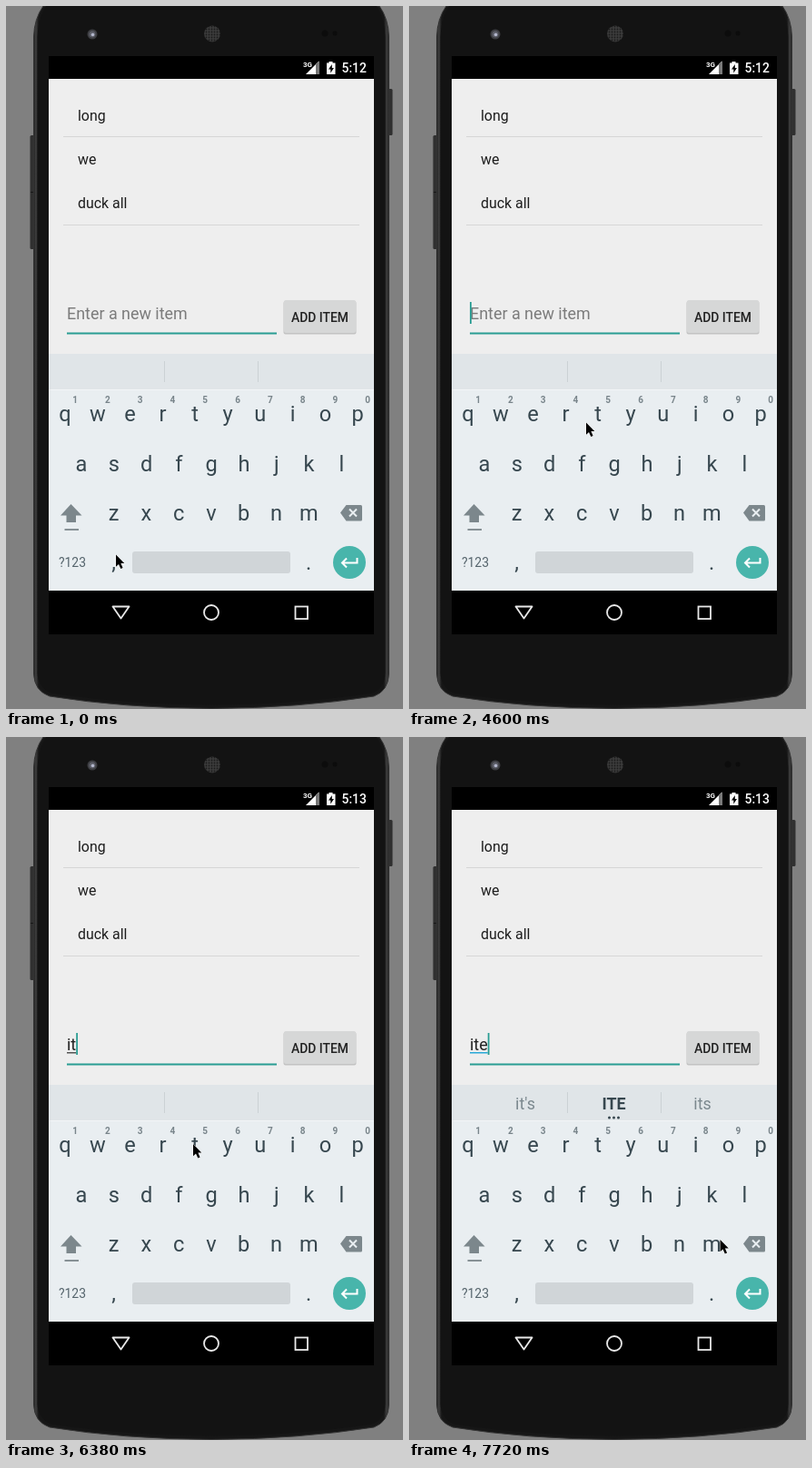
Animation of 437 by 772 pixels, one loop 8000 ms. Source, as an HTML page:

```html
<!DOCTYPE html>
<html lang="en">
<head>
<meta charset="utf-8">
<title>Adding an item</title>
<style>
html, body { margin: 0; height: 100%; overflow: hidden; background: #808080; }
svg { display: block; width: 437px; height: 772px; }
text { font-family: Roboto, Arial, sans-serif; white-space: pre; }
.list { font-size: 15.9px; fill: #1d1d1d; }
.field { font-size: 17.9px; }
.mid { text-anchor: middle; }
.key { font-size: 23.6px; fill: #37474f; }
.digit { font-size: 10px; font-weight: 700; fill: #78848a; }
.word { font-size: 17.9px; fill: #7b888e; }
.best { font-weight: 700; fill: #37474f; }
</style>
</head>
<body>
<svg viewBox="0 0 437 772">
  <defs>
    <linearGradient id="rim">
      <stop offset="0" stop-color="#1c1c1c"/>
      <stop offset=".006" stop-color="#404040"/>
      <stop offset=".014" stop-color="#161616"/>
      <stop offset=".986" stop-color="#161616"/>
      <stop offset=".994" stop-color="#404040"/>
      <stop offset="1" stop-color="#1c1c1c"/>
    </linearGradient>
    <pattern id="mesh" width="3" height="3" patternUnits="userSpaceOnUse">
      <rect width="3" height="3" fill="#3b3b3b"/>
      <circle cx="1.5" cy="1.5" r=".9" fill="#1b1b1b"/>
    </pattern>
  </defs>

  <!-- Phone -->
  <rect width="437" height="772" fill="#808080"/>
  <rect x="26.5" y="142" width="6" height="125" rx="1.5" fill="#303030"/>
  <path d="M27 204.5H31" stroke="#171717"/>
  <rect x="419.500" y="91" width="6" height="51" rx="1.5" fill="#303030"/>
  <path d="M41 0Q31 14 30.500 34V733Q31 752 48 758Q130 771 226 771.500Q322 771 405 758Q421 752 421.500 733V34Q421 14 411 0Z" fill="url(#rim)" stroke="#333"/>
  <path d="M44 0Q35 14 34.500 34V732Q35 749 50 754.500Q130 767 226 767.500Q322 767 403 754.500Q417 749 417.500 732V34Q417 14 408 0Z" fill="#131313"/>
  <circle cx="95" cy="31" r="5.500" fill="#3d3e42"/>
  <circle cx="95" cy="31" r="3.500" fill="#5d5f69"/>
  <circle cx="95.500" cy="31.500" r="1.800" fill="#b3b7cc"/>
  <circle cx="227" cy="30.500" r="9" fill="url(#mesh)"/>
  <circle cx="351" cy="30" r="3.500" fill="#0c0c0c"/>
  <circle cx="362" cy="30" r="2.500" fill="#0c0c0c"/>

  <!-- Status bar -->
  <rect x="47" y="55" width="358" height="635"/>
  <path d="M344.500 60.500V75H330Z" fill="#fff"/>
  <path d="M344.500 60.500V75H341V64Z" fill="#777"/>
  <text x="327" y="67" font-size="8" font-weight="700" fill="#fff">3G</text>
  <path d="M353 62.500H355.500V61H359.500V62.500H362.500V75H353Z" fill="#fff"/>
  <path d="M358.800 64L355 69.500H357.300V73.500L361 68H358.800Z"/>
  <text id="clock" x="369.500" y="73" font-size="13.900" font-weight="500" fill="#fff"></text>

  <!-- List and form -->
  <rect x="47" y="80" width="358" height="302" fill="#eee"/>
  <path d="M63 143.500H389M63 240.500H389" stroke="#d6d6d6"/>
  <g class="list">
    <text x="79" y="125.500">long</text>
    <text x="79" y="174">we</text>
    <text x="79" y="222">duck all</text>
  </g>
  <text id="hint" class="field" x="67" y="344" fill="#7b7b7b">Enter a new item</text>
  <text id="typed" class="field" x="67" y="344" fill="#212121"></text>
  <rect id="mark" x="67" y="346" height="1.500"/>
  <rect id="caret" y="325" width="1.800" height="24" fill="#2a9d93"/>
  <path d="M67 359.500H298" stroke="#2a9d93" stroke-width="1.800"/>
  <rect x="305.500" y="324" width="80" height="36.500" rx="2" fill="#c3c3c3"/>
  <rect x="306" y="323" width="79" height="36" rx="2" fill="#d6d7d7"/>
  <text class="mid" x="345.500" y="347" font-size="13.900" font-weight="500" fill="#212121">ADD ITEM</text>

  <!-- Keyboard -->
  <rect x="47" y="382" width="358" height="39" fill="#e0e5e8"/>
  <rect x="47" y="421" width="358" height="221" fill="#e9eef1"/>
  <path d="M47 421.500H405" stroke="#f2f5f7"/>
  <path d="M174.500 390V413M277.500 390V413" stroke="#cbd1d4"/>
  <g id="words" class="mid"></g>
  <g id="dots" fill="#37474f">
    <circle cx="220.500" cy="418" r="1.500"/>
    <circle cx="225.500" cy="418" r="1.500"/>
    <circle cx="230.500" cy="418" r="1.500"/>
  </g>
  <g id="keys" class="mid"></g>
  <path d="M71.500 547L83.500 559.500H77V567H66.500V559.500H60Z" fill="#7c878c"/>
  <path d="M64.500 575H80" stroke="#7c878c" stroke-width="1.800"/>
  <path d="M368 556.500L374.500 548H390.500Q392 548 392 549.500V564Q392 565.500 390.500 565.500H374.500Z" fill="#7c878c"/>
  <path d="M378 552.500L386 560.500M386 552.500L378 560.500" stroke="#e9eef1" stroke-width="2"/>
  <text x="58" y="616" font-size="13.900" fill="#55646c">?123</text>
  <rect x="139" y="599" width="174" height="24" rx="3" fill="#d0d5d8"/>
  <circle cx="378" cy="611" r="18" fill="#48b5ab"/>
  <path d="M386.500 606V611.500H370.500M375 606.500L370 611.500L375 616.500" fill="none" stroke="#fff" stroke-width="2"/>

  <!-- Navigation bar -->
  <g fill="none" stroke="#e8e8e8" stroke-width="1.800">
    <path d="M117.500 659.500H135.500L126.500 672.500Z" stroke-linejoin="round"/>
    <circle cx="226" cy="666" r="8"/>
    <rect x="318.500" y="659.500" width="13.500" height="13.500"/>
  </g>

  <path id="pointer" d="M0 0V13.200L3 10.400L5.300 15.600L7.600 14.600L5.400 9.600H9.300Z" stroke="#fff" stroke-width="1" paint-order="stroke"/>
</svg>
<script>
const LOOP = 8000;
const $ = id => document.getElementById(id);

// Every track is a list of [start, ...values], each held until the next start.
const pointerTrack = [
  [0, 121, 602.5], [3260, 104, 541.5], [3410, 107, 535], [3560, 115, 525],
  [3710, 126, 515], [3860, 140, 506], [4010, 151, 499], [4300, 163, 485],
  [4450, 181, 470], [4600, 195, 457.5], [4750, 225, 453], [4900, 264, 451],
  [5050, 299, 453], [5200, 318, 456], [5640, 297, 451], [5790, 259, 447],
  [5940, 226, 447], [6090, 209, 447], [6240, 206, 447], [6830, 186, 448],
  [6980, 156, 449], [7130, 140, 450], [7430, 196, 471], [7580, 285, 518],
  [7720, 342.5, 552]
];
const caretTrack = [
  [0, 0], [140, 1], [740, 0], [1180, 1], [1780, 0], [2220, 1], [2670, 0],
  [3260, 1], [3710, 0], [4300, 1], [4750, 0], [5340, 1], [5940, 0],
  [6240, 1], [6830, 0], [7280, 1]
];
const typedTrack = [[0, ""], [5340, "i"], [6240, "it"], [7280, "ite"]];
const wordTrack = [
  [0, "", "", ""], [6390, "of", "if", "it's"], [7430, "it's", "ITE", "its"]
];
const clockTrack = [[0, "5:12"], [4900, "5:13"]];

const at = (track, t) => track.findLast(step => step[0] <= t).slice(1);

function addText(parent, name, x, y, label) {
  const el = document.createElementNS("http://www.w3.org/2000/svg", "text");
  el.setAttribute("class", name);
  el.setAttribute("x", x);
  el.setAttribute("y", y);
  el.textContent = label;
  return parent.appendChild(el);
}

function addRow(name, label, x, y) {
  [...label].forEach((c, i) => addText($("keys"), name, x + 35.8 * i, y, c));
}

addRow("digit", "1234567890", 76, 436);
addRow("key", "qwertyuiop", 65, 456);
addRow("key", "asdfghjkl", 83, 510.5);
addRow("key", "zxcvbnm", 118.5, 565);
addText($("keys"), "key", 118.5, 619, ",");
addText($("keys"), "key", 333, 619, ".");
const words = [128, 225.5, 323].map(x => addText($("words"), "word", x, 409, ""));

function draw(now) {
  const t = now % LOOP;
  const [typed] = at(typedTrack, t);
  const labels = at(wordTrack, t);
  const corrected = labels[1] === "ITE";

  $("clock").textContent = at(clockTrack, t)[0];
  $("typed").textContent = typed;
  $("hint").style.opacity = typed ? 0 : 1;
  const width = typed ? $("typed").getComputedTextLength() : 0;
  $("mark").setAttribute("width", width);
  $("mark").setAttribute("fill", corrected ? "#29a9d8" : "#555");
  $("caret").setAttribute("x", 67 + width);
  $("caret").style.opacity = at(caretTrack, t)[0];

  words.forEach((el, i) => el.textContent = labels[i]);
  words[1].classList.toggle("best", corrected);
  $("dots").style.opacity = labels[1] ? 1 : 0;
  $("pointer").setAttribute("transform", `translate(${at(pointerTrack, t)})`);
}

const start = performance.now();
function frame() {
  draw(performance.now() - start);
  requestAnimationFrame(frame);
}
frame();
</script>
</body>
</html>
```
